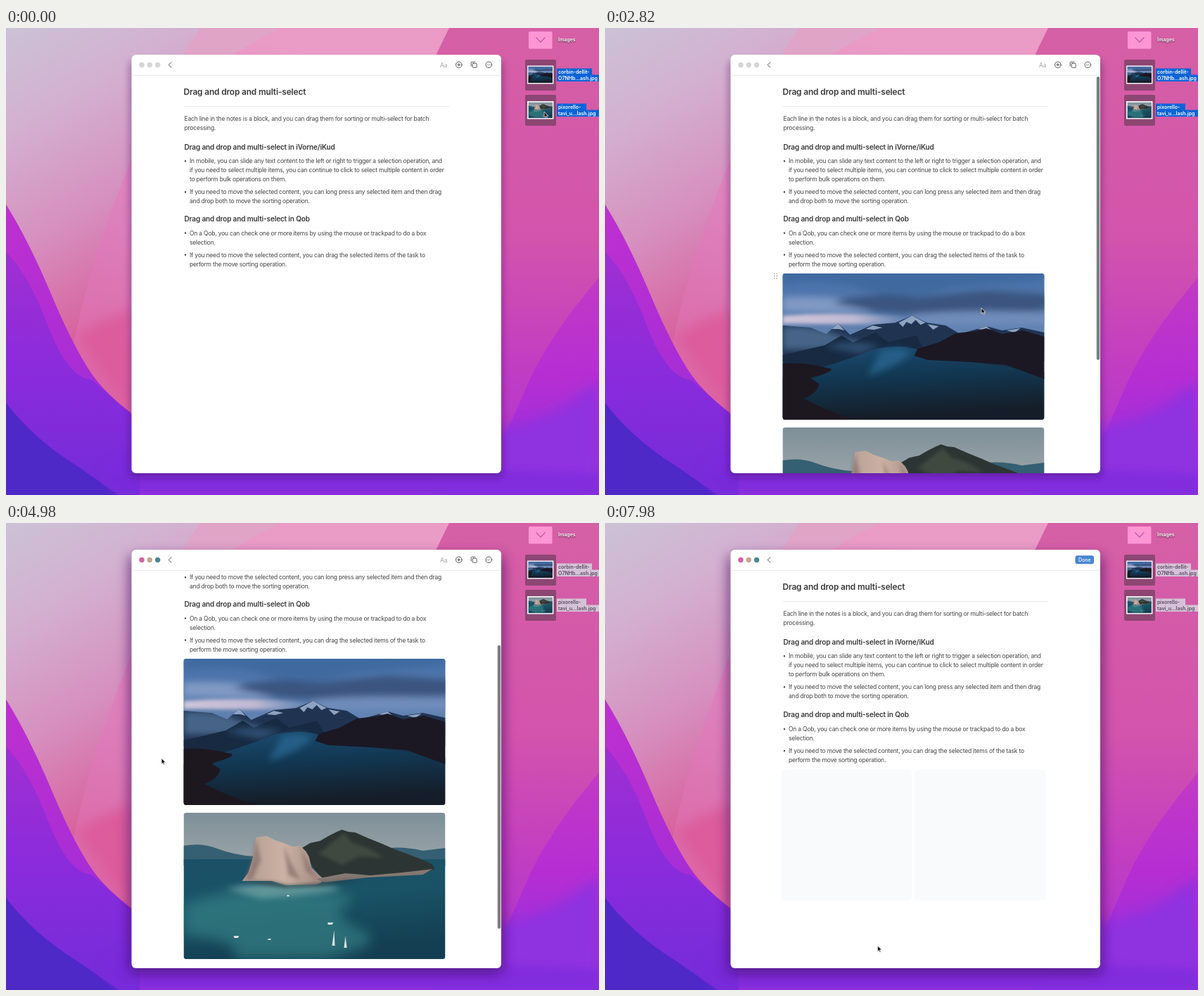
An HTML page that plays this animation: 843x664 px, repeating every 8000 ms.

```html
<!DOCTYPE html>
<html lang="en">
<head>
<meta charset="utf-8">
<title>Drag and drop and multi-select</title>
<style>
  html, body { margin: 0; width: 100%; height: 100%; overflow: hidden; background: #a32fd8; }
  svg { display: block; width: 100%; height: 100%; }
  text { font-family: Inter, "Open Sans", sans-serif; }
  .title { font-size: 11.9px; font-weight: 600; letter-spacing: -.14px; fill: #3a3a3a; }
  .head { font-size: 10px; font-weight: 600; letter-spacing: -.14px; fill: #383838; }
  .body { font-size: 8.5px; letter-spacing: -.2px; fill: #444; }
  .label { font-size: 7px; font-weight: 600; }
  .tool { font-size: 5.8px; text-anchor: middle; fill: #333; }
  .line { fill: none; stroke: #333; stroke-width: .8; stroke-linecap: round; stroke-linejoin: round; }
</style>
</head>
<body>
<svg viewBox="0 0 843 664" preserveAspectRatio="none">
<defs>
  <linearGradient id="pale" x1="0" y1="0" x2=".35" y2="1">
    <stop offset="0" stop-color="#cbc2d6"/><stop offset=".3" stop-color="#d3b0d0"/>
    <stop offset=".65" stop-color="#d68fbf"/><stop offset="1" stop-color="#d8609c"/>
  </linearGradient>
  <linearGradient id="rose" x1=".5" y1="0" x2=".2" y2="1">
    <stop offset="0" stop-color="#ea9bc6"/><stop offset=".5" stop-color="#dc7fbb"/><stop offset="1" stop-color="#dd5c9c"/>
  </linearGradient>
  <linearGradient id="right" x1="0" y1="0" x2="0" y2="1">
    <stop offset="0" stop-color="#d660a5"/><stop offset=".45" stop-color="#d254ac"/>
    <stop offset=".7" stop-color="#c33fc0"/><stop offset="1" stop-color="#a933d6"/>
  </linearGradient>
  <linearGradient id="ridge" x1="0" y1="0" x2="0" y2="1">
    <stop offset="0" stop-color="#c23ac4"/><stop offset=".45" stop-color="#b62ed2"/><stop offset="1" stop-color="#8e2fe0"/>
  </linearGradient>
  <linearGradient id="wedge" x1="0" y1="0" x2=".2" y2="1">
    <stop offset="0" stop-color="#bf30d0"/><stop offset="1" stop-color="#9c2cd8"/>
  </linearGradient>
  <linearGradient id="violet" x1="0" y1="0" x2="0" y2="1">
    <stop offset="0" stop-color="#a02fd2"/><stop offset=".5" stop-color="#8a2bdc"/><stop offset="1" stop-color="#742cd8"/>
  </linearGradient>
  <linearGradient id="sky1" x1="0" y1="0" x2="0" y2="1">
    <stop offset="0" stop-color="#4670a9"/><stop offset=".55" stop-color="#587cae"/><stop offset="1" stop-color="#6c88b4"/>
  </linearGradient>
  <linearGradient id="glow" x1="0" y1="0" x2="1" y2="0">
    <stop offset="0" stop-color="#cfc5da"/><stop offset=".55" stop-color="#c0b9d2"/><stop offset="1" stop-color="#a5adcc" stop-opacity="0"/>
  </linearGradient>
  <linearGradient id="lake" x1="0" y1="0" x2=".2" y2="1">
    <stop offset="0" stop-color="#1d4d73"/><stop offset=".45" stop-color="#123853"/><stop offset="1" stop-color="#151d28"/>
  </linearGradient>
  <linearGradient id="sky2" x1="0" y1="0" x2="0" y2="1">
    <stop offset="0" stop-color="#7d8f97"/><stop offset="1" stop-color="#9da6ab"/>
  </linearGradient>
  <linearGradient id="sea" x1="0" y1="0" x2=".3" y2="1">
    <stop offset="0" stop-color="#1c5068"/><stop offset=".5" stop-color="#195365"/><stop offset="1" stop-color="#143f53"/>
  </linearGradient>
  <linearGradient id="rock" x1="0" y1="0" x2="1" y2="0">
    <stop offset="0" stop-color="#b39a90"/><stop offset=".5" stop-color="#cbb2a4"/><stop offset="1" stop-color="#a08780"/>
  </linearGradient>
  <filter id="soft" x="-30%" y="-30%" width="160%" height="160%"><feGaussianBlur stdDeviation="5"/></filter>
  <filter id="haze" x="-30%" y="-30%" width="160%" height="160%"><feGaussianBlur stdDeviation="9"/></filter>
  <filter id="mist" x="-30%" y="-30%" width="160%" height="160%"><feGaussianBlur stdDeviation="2.500"/></filter>
  <clipPath id="photoClip"><rect width="372" height="208" rx="4"/></clipPath>
  <clipPath id="pageClip"><path d="M178.500 68H704V627a6 6 0 0 1-6 6H184.500a6 6 0 0 1-6-6Z"/></clipPath>

  <g id="lakePhoto" clip-path="url(#photoClip)">
    <rect width="372" height="208" fill="#16324c"/>
    <rect width="372" height="110" fill="url(#sky1)"/>
    <g filter="url(#soft)">
      <path d="M0 14Q70 4 120 24T240 20L372 8V-10H0Z" fill="#406a9f"/>
      <path d="M0 34Q70 30 120 44T60 56L0 54Z" fill="#8099c4"/>
      <path d="M70 42Q120 24 190 34L290 24 380 30V52Q230 64 130 54Z" fill="#3b5480"/>
      <path d="M180 58Q280 50 380 56V74H200Z" fill="#6f8cba"/>
    </g>
    <path d="M0 60Q90 54 185 63L165 72H0Z" fill="url(#glow)" filter="url(#mist)"/>
    <path d="M0 74 40 77 62 86 79 71 96 87 128 73 160 70 184 60 205 70 232 74 252 86 290 75 312 81 340 77 372 84V125H0Z" fill="#203452"/>
    <path d="M165 70 184 60 203 70 196 73 189 66 183 72 176 69 171 76ZM70 79 79 71 88 81 80 79ZM277 79 290 75 298 82 287 80ZM118 79 128 74 142 77 130 80ZM206 72 222 75 214 80ZM318 81 338 78 330 84Z" fill="#8ea3c2"/>
    <path d="M0 76Q40 72 75 86T120 100L90 108H0Z" fill="#5c7fa6" filter="url(#soft)" opacity=".65"/>
    <path d="M0 116 60 102 84 88 100 98 132 84 150 98 190 88 200 106V208H0Z" fill="#172a42"/>
    <path d="M60 104Q95 92 140 104L110 114Z" fill="#34587f" filter="url(#soft)" opacity=".8"/>
    <path d="M132 107Q180 99 200 112L240 122 372 140V208H0V150Q80 128 132 107Z" fill="url(#lake)"/>
    <path d="M140 110Q175 102 182 114Q160 134 120 146Q132 125 140 110Z" fill="#2b6a96" filter="url(#soft)" opacity=".7"/>
    <path d="M187 117 192 107 222 98 246 85 275 82 290 78 312 86 342 81 372 90V150L317 130 267 126 206 123Z" fill="#1b1824"/>
    <path d="M0 128Q30 126 62 134 84 136 40 149L52 157Q50 170 30 178 60 194 102 208H0Z" fill="#1d1820"/>
  </g>

  <g id="islandPhoto" clip-path="url(#photoClip)">
    <rect width="372" height="75" fill="url(#sky2)"/>
    <path d="M0 47Q25 42 48 51T100 62V75H0ZM270 52Q310 46 340 54L372 50V76H270Z" fill="#355f72"/>
    <rect y="66" width="372" height="142" fill="url(#sea)"/>
    <path d="M0 130Q70 104 160 108T240 125Q200 145 250 165T200 208H70Q90 180 0 175Z" fill="#348085" opacity=".7" filter="url(#haze)"/>
    <path d="M60 108Q130 94 200 102T110 122Z" fill="#78a9a9" filter="url(#soft)" opacity=".7"/>
    <path d="M165 52 180 43 194 40 206 33 218 27 225 24 234 27 244 28 262 36 282 44 300 52 322 60 340 67 353 73 357 80 340 87 262 91 200 98Z" fill="#2c3533"/>
    <path d="M192 58 228 29 238 42 262 50 286 64 250 62 225 74Z" fill="#414a40" filter="url(#mist)"/>
    <path d="M103 35 118 33 130 39 142 43 155 48 166 47 174 55 178 62 182 78 192 88 201 96 190 102 145 103 125 97 83 97 92 85 99 62Z" fill="url(#rock)"/>
    <path d="M103 36 110 68 98 94 88 95 99 62ZM142 46 152 70 166 96 149 88ZM166 48 180 77 190 96 174 82Z" fill="#7f6b66" opacity=".65" filter="url(#mist)"/>
    <path d="M188 94 230 86 265 89 310 85 354 80 340 88 262 92 200 99Z" fill="#857872"/>
    <path d="M83 97 125 98 150 103 201 99 260 93 200 104 145 107Z" fill="#2a3336" opacity=".6" filter="url(#mist)"/>
    <path d="M71 175h8l-2 3h-5zM205 156h8l-2 3h-6zM120 179h4v2h-4zM211 189l3-22 1 22zM228 192l2-17 2 17zM147 117h3v2h-3z" fill="#dfe5e3"/>
  </g>

  <g id="thumbs">
    <rect x="741" y="53.500" width="37.500" height="26" fill="#f4f2f5"/>
    <use href="#lakePhoto" transform="translate(742.500 55) scale(.0925 .1105)"/>
    <rect x="741" y="104" width="37.500" height="25.500" fill="#f4f2f5"/>
    <use href="#islandPhoto" transform="translate(742.500 105.500) scale(.0925 .108)"/>
  </g>
  <g id="pick">
    <rect x="248.500" y="-4" width="385.500" height="216" rx="3"/>
  </g>
  <g id="check">
    <circle r="4.200" fill="#2d6cdb"/><circle r="2.900" fill="#2d6cdb" stroke="#dce8fa" stroke-width=".8"/>
  </g>
</defs>

<!-- desktop -->
<rect width="843" height="664" fill="url(#right)"/>
<path d="M0 0H630Q600 60 560 150T190 600L90 520 0 260Z" fill="url(#rose)"/>
<path d="M275 0H392Q340 24 290 60L178 150Z" fill="#dfa4c6"/>
<path d="M0 0H276Q215 90 165 220T96 450L0 250Z" fill="url(#pale)"/>
<path d="M178 400Q125 420 100 440L178 545Z" fill="#dc5c9c" filter="url(#haze)"/>
<path d="M843 355Q770 440 740 510T690 620L600 664H843Z" fill="url(#ridge)"/>
<path d="M843 500Q780 560 700 570T180 600V664H843Z" fill="#8f30e0" filter="url(#haze)"/>
<path d="M0 251Q32 302 64 378T122 492Q145 525 190 556V664H0Z" fill="url(#wedge)"/>
<path d="M0 318Q32 350 60 424T122 500L190 560V664H0Z" fill="url(#violet)"/>
<path d="M0 533Q40 585 100 622L160 664H0Z" fill="#4f28c8"/>
<path d="M160 664Q100 620 178 600L843 635V664Z" fill="#7a2cdc" opacity=".65" filter="url(#soft)"/>

<!-- desktop icons -->
<path d="M743 6.500a1.500 1.500 0 0 1 1.500-1.500H775a1.500 1.500 0 0 1 1.500 1.500V28a1.500 1.500 0 0 1-1.500 1.500H744.500a1.500 1.500 0 0 1-1.500-1.500Z" fill="#ff96d4"/>
<path d="M753.500 13.500 760 20 766.500 13.500" fill="none" stroke="#c25aa6" stroke-width="1.300"/>
<text class="label" x="785" y="19" fill="#fff" style="text-shadow:0 .5px 1.5px rgba(0,0,0,.7)">Images</text>
<rect x="738" y="45" width="44" height="44" rx="2" fill="#8d4673"/>
<rect x="738" y="95" width="44" height="44" rx="2" fill="#8d4673"/>
<use href="#thumbs"/>
<g id="tags">
  <path d="M783 57.500H833V66.500H843V76H783ZM783 107.500H825V116.500H843V126H783Z"/>
  <g class="label">
    <text x="785" y="64.800">corbin-dellit-</text><text x="785" y="73.800">O7NHb...ash.jpg</text>
    <text x="785" y="114.800">pixorello-</text><text x="785" y="123.800">tavi_u...lash.jpg</text>
  </g>
</g>

<!-- window -->
<rect id="shade" x="175" y="46" width="532" height="594" rx="8" fill="#3a0a5a"/>
<rect x="178.500" y="38" width="525.500" height="595" rx="6" fill="#fff"/>
<g clip-path="url(#pageClip)">
  <g id="page">
    <g id="copy"></g>
    <path d="M252.500 111.500H630" stroke="#e9e9e9"/>
    <g id="first" transform="translate(0 349)">
      <use id="pickA" href="#pick"/>
      <use href="#lakePhoto" id="lakeImg" x="252.500"/>
      <rect id="veil" x="252.500" width="372" height="208" rx="4" fill="#c9a8d8"/>
      <circle id="dim" cx="628" cy="104" r="3.500" fill="#e3e3e8"/>
      <use id="checkA" href="#check" x="628" y="104"/>
    </g>
    <g id="second" transform="translate(0 568)">
      <use id="pickB" href="#pick"/>
      <use href="#islandPhoto" id="islandImg" x="252.500"/>
      <use id="checkB" href="#check" x="628" y="104"/>
    </g>
    <g id="cells" fill="#f8fafc">
      <rect x="251" y="350.500" width="185" height="186.500" rx="5"/>
      <rect x="440.500" y="350.500" width="186.500" height="186.500" rx="5"/>
    </g>
    <path id="grip" d="M240.800 0v8M244.300 0v8" stroke="#777" stroke-width="1.200" stroke-dasharray="1.200 1.900"/>
  </g>
  <rect id="bar" x="698.800" width="4.400" height="403" rx="2.200" fill="#7f7c80"/>
  <rect id="band" fill="#6d9be0" fill-opacity=".14" stroke="#7fa6e0" stroke-width=".8"/>
</g>
<path d="M178.500 67.500H704" stroke="#ebebeb"/>
<g id="dots"><circle cx="193" cy="52.500" r="3.700"/><circle cx="204.300" cy="52.500" r="3.700"/><circle cx="215.600" cy="52.500" r="3.700"/></g>
<path class="line" d="M235 48.800 231 52.400 235 56"/>
<g id="tools">
  <text x="617" y="55.500" font-size="8.500" fill="#a2a2a2">Aa</text>
  <g class="line">
    <circle cx="643.800" cy="52.300" r="4.300"/><path d="M641.800 52.300h4M643.800 50.300v4"/>
    <rect x="663.200" y="50.300" width="6" height="6" rx="1"/><path d="M661.200 54V49.300a1 1 0 0 1 1-1H667"/>
    <circle cx="686.300" cy="52.300" r="4.300"/><path d="M684.300 52.300h.01M686.300 52.300h.01M688.300 52.300h.01" stroke-width="1.100"/>
  </g>
</g>
<g id="done">
  <rect x="668.500" y="46.300" width="26.500" height="12" rx="3" fill="#4a84d3"/>
  <text x="681.800" y="54.800" font-size="7" font-weight="500" text-anchor="middle" fill="#fff">Done</text>
</g>
<g id="menu">
  <rect x="363" y="588" width="156.500" height="32" rx="5" fill="#23384a" opacity=".4" filter="url(#soft)"/>
  <rect x="363" y="587" width="156.500" height="31.500" rx="5" fill="#eff2f5"/>
  <g class="line">
    <rect x="381" y="595" width="8" height="7.500" rx="1"/><path d="M385 595v4h4M381 599h8M385 599v3.500"/>
    <rect x="410.500" y="595" width="5.500" height="3"/><rect x="410.500" y="600" width="4" height="3"/><rect x="417.500" y="595" width="3.500" height="8"/>
    <path d="M443 596v-1.500q0-1 1-1h3l2.500 2.500v4.500q0 1-1 1h-1"/><rect x="440.800" y="596.500" width="5.700" height="7" rx="1"/>
    <path d="M467 597 475 602.500M467 601.500 475 595.500"/><circle cx="466" cy="596" r="1.400"/><circle cx="466" cy="602.300" r="1.400"/>
    <path d="M492.500 595.500h9M495.500 595.500v-1.500h3v1.500M493.500 596l.5 7.500h6l.5-7.500M496 598v3.500M498 598v3.500" stroke="#d8549a"/>
  </g>
  <g class="tool">
    <text x="385" y="610.300">Group</text><text x="415.700" y="610.300">Layout</text><text x="445" y="610.300">Copy</text>
    <text x="470" y="610.300">Cut</text><text x="497" y="610.300" style="fill:#d8549a">Delete</text>
  </g>
</g>
<use id="ghost" href="#thumbs"/>
<path id="cursor" d="M0 0V8.200L1.900 6.500 3.200 9.400 4.600 8.800 3.300 6H5.900Z" fill="#111" stroke="#fff" stroke-width=".7"/>
</svg>

<script>
const $ = id => document.getElementById(id);
const NS = "http://www.w3.org/2000/svg";
const LOOP = 8000, STEP = 60;
const DROP = 1740, FOCUS = 4680, PRESS = 5160, RELEASE = 6540, GROUP = 7740;

// Text blocks: class, x, baseline, text; a leading "*" draws a bullet.
const blocks = [
  ["title", 252.5, 94.7, "Drag and drop and multi-select"],
  ["body", 253.5, 132.3, "Each line in the notes is a block, and you can drag them for sorting or multi-select for batch"],
  ["body", 253.5, 145.3, "processing."],
  ["head", 253.5, 173.3, "Drag and drop and multi-select in iVorne/iKud"],
  ["body", 261, 192.3, "*In mobile, you can slide any text content to the left or right to trigger a selection operation, and"],
  ["body", 261, 205.3, "if you need to select multiple items, you can continue to click to select multiple content in order"],
  ["body", 261, 218.3, "to perform bulk operations on them."],
  ["body", 261, 236.3, "*If you need to move the selected content, you can long press any selected item and then drag"],
  ["body", 261, 249.3, "and drop both to move the sorting operation."],
  ["head", 253.5, 275.3, "Drag and drop and multi-select in Qob"],
  ["body", 261, 294.5, "*On a Qob, you can check one or more items by using the mouse or trackpad to do a box"],
  ["body", 261, 307.5, "selection."],
  ["body", 261, 325.5, "*If you need to move the selected content, you can drag the selected items of the task to"],
  ["body", 261, 338.5, "perform the move sorting operation."]
];

function add(tag, attrs, text) {
  const el = document.createElementNS(NS, tag);
  for (const k in attrs) el.setAttribute(k, attrs[k]);
  if (text) el.textContent = text;
  return $("copy").appendChild(el);
}
const lower = [];
for (const [cls, x, y, text] of blocks) {
  const parts = [add("text", { class: cls, x, y }, text.replace("*", ""))];
  if (text[0] === "*") parts.push(add("circle", { cx: 255, cy: y - 3, r: 1.2, fill: "#444" }));
  if (y > 270) lower.push(...parts.map(el => [el, y > 290 ? 1.4 : .8]));
}

const ramp = (t, a, b) => Math.max(0, Math.min(1, (t - a) / (b - a)));
const smooth = p => p * p * (3 - 2 * p);
const set = (id, attrs) => { for (const k in attrs) $(id).setAttribute(k, attrs[k]); };
const show = (id, on) => set(id, { opacity: +on });

// Cursor stops: start, end, x, y reached at the end.
const stops = [
  [180, 1560, 539.5, 410], [2040, 2460, 535, 398], [3720, 4560, 221, 334.5],
  [PRESS, 6480, 405, 645], [7020, 7620, 387.5, 601]
];
function cursorAt(t) {
  let x = 765, y = 119;
  for (const [a, b, tx, ty] of stops) {
    const p = smooth(ramp(t, a, b));
    x += (tx - x) * p;
    y += (ty - y) * p;
  }
  return [x, y];
}

function draw(t) {
  const [x, y] = cursorAt(t);
  const grouped = t >= GROUP, active = t >= FOCUS;
  const dragging = t >= 180 && t < DROP, banding = t >= PRESS && t < RELEASE;
  const fade = ramp(t, DROP, DROP + 480), fadeB = ramp(t, 2040, 2400);
  const scroll = grouped ? 0 : 156 * (1 - (1 - ramp(t, 2820, 3435)) ** 2);

  set("cursor", { transform: `translate(${x} ${y})` });
  set("ghost", { transform: `translate(${x - 765} ${y - 119})`, opacity: dragging ? .7 : 0 });
  set("page", { transform: `translate(0 ${-scroll})` });
  for (const [el, dy] of lower) el.setAttribute("transform", `translate(0 ${grouped ? dy : 0})`);

  // photos
  show("first", t >= DROP && !grouped);
  show("second", t >= 2040 && !grouped);
  show("cells", grouped);
  set("lakeImg", { opacity: fade });
  set("islandImg", { opacity: fadeB });
  const pending = fade < 1;
  set("veil", { opacity: pending ? .32 * (1 - fade) : 0 });
  show("dim", pending);

  // selection
  const selA = t > PRESS && x > 249, selB = selA && (y > 408 || t > RELEASE);
  set("pickA", { opacity: +(pending || selA), fill: selA ? "#e9f0f8" : "#f8f8fb", stroke: selA ? "#a9c3e4" : "#e4e4ea" });
  set("pickB", { opacity: +selB, fill: "#e9f0f8", stroke: "#a9c3e4" });
  show("checkA", selA);
  show("checkB", selB);
  set("band", { x: 221, y: 334.5, width: Math.max(0, x - 221), height: Math.max(0, y - 334.5), opacity: +banding });

  // drag handle and scroll bar
  const empty = t < 2040;
  set("grip", { transform: `translate(0 ${empty ? 568 : 349})`, opacity: t < DROP || t >= 4020 ? 0 : empty ? .35 : 1 });
  set("bar", { y: 69 + .672 * scroll, opacity: t < 2760 ? 0 : 1 - ramp(t, 5100, 5400) });

  // window chrome
  ["#d95fa3", "#c6a58c", "#4a8794"].forEach((c, i) =>
    $("dots").children[i].setAttribute("fill", active ? c : "#d6d6d8"));
  set("shade", { opacity: active ? .62 : .34, filter: active ? "url(#haze)" : "url(#soft)" });
  show("tools", !selA);
  show("done", selA);
  set("menu", { opacity: grouped ? 0 : ramp(t, 6600, 6780) });
  const [back, type] = $("tags").children;
  back.setAttribute("fill", active ? "#d4c3d6" : "#0a63d8");
  type.setAttribute("fill", active ? "#5d4a62" : "#fff");
}

const start = performance.now();
function tick() {
  const t = (performance.now() - start) % LOOP;
  draw(Math.floor(t / STEP) * STEP);
  requestAnimationFrame(tick);
}
tick();
</script>
</body>
</html>
```
